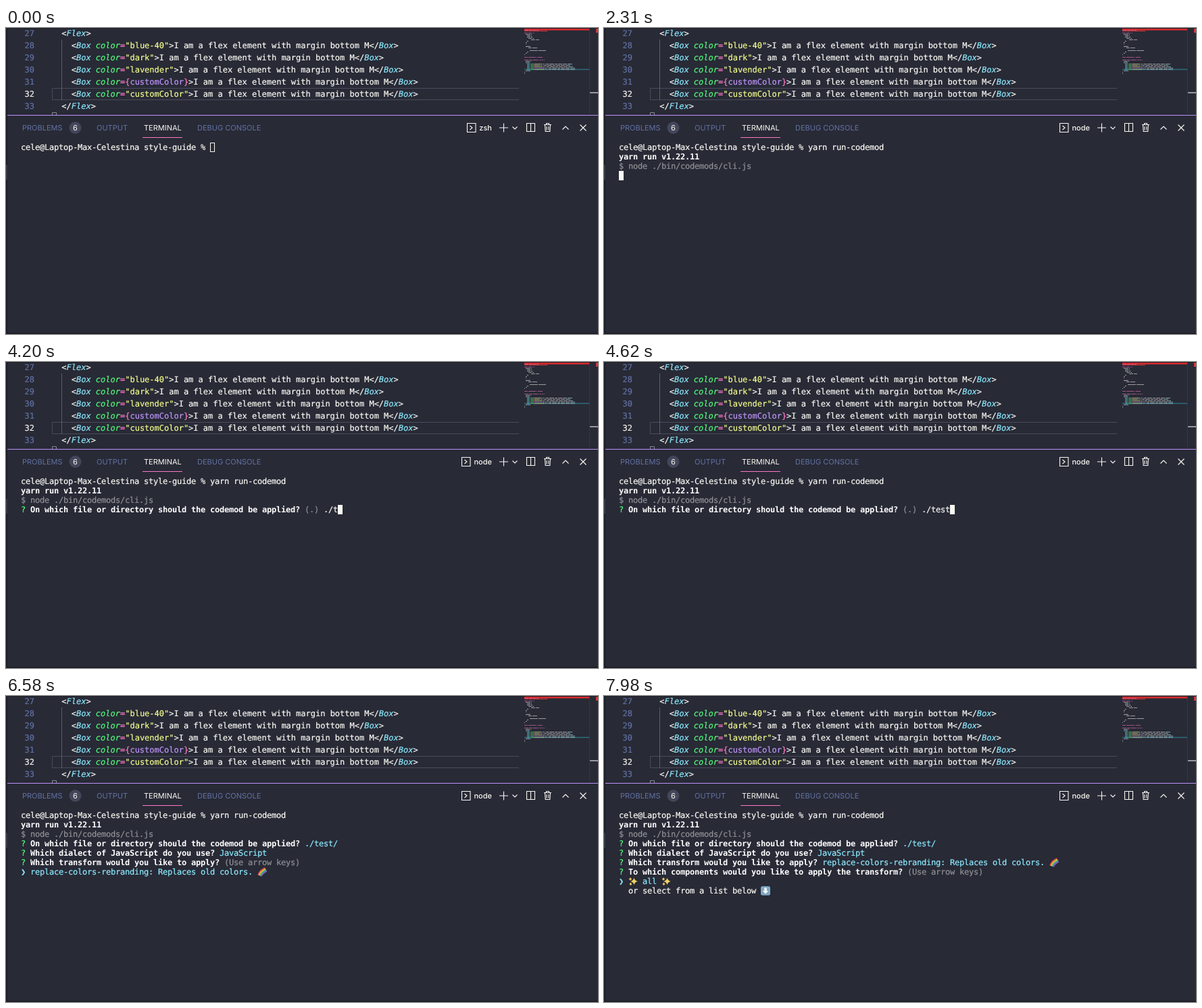
Recreate the animation shown at these times as an HTML page. Size 876x454 px, loop 8000 ms.

```html
<!DOCTYPE html>
<html lang="en">
<head>
<meta charset="utf-8">
<title>Codemod in a terminal</title>
<style>
html, body { margin: 0; height: 100%; overflow: hidden; background: #282a36; }
svg { display: block; width: 876px; height: 454px; }
text { white-space: pre; text-rendering: geometricPrecision; fill: currentColor; color: #f8f8f2; }
.mono text { font: 12px "DejaVu Sans Mono", Menlo, monospace; stroke: currentColor; stroke-width: .22px; }
.ui text { font: 11px Inter, "Open Sans", sans-serif; }
#term text { letter-spacing: -.224px; }
.mono .bold { font-weight: bold; color: #fff; stroke-width: 0; }
.mono .tag { color: #8be9fd; font-style: italic; }
.mono .attr { color: #50fa7b; font-style: italic; }
.mono .op { color: #ff79c6; }
.mono .str { color: #f1fa8c; }
.mono .var { color: #bd93f9; }
.mono .cyan { color: #8be9fd; }
.mono .green { color: #50fa7b; }
.mono .dim { color: #8f9095; }
.mono .num, .ui .off { color: #6272a4; }
.icon { fill: none; stroke: #f8f8f2; stroke-width: 1.1; }
</style>
</head>
<body>
<svg viewBox="0 0 876 454">
  <rect width="876" height="454" fill="#282a36"/>
  <g fill="none" stroke="#4a4c5c">
    <path d="M759 89.5H68.5V106.5H759"/>
    <path d="M82.5 17V107" stroke="#5a5c68"/>
    <path d="M68.5 129V125.5H74.5V129" stroke="#8a8b92"/>
    <path d="M863.5 0V128" stroke="#343644"/>
  </g>
  <g id="code" class="mono"></g>
  <g id="map"></g>
  <path d="M864 96H876" stroke="#b4b5ba" stroke-width="1.6"/>
  <path d="M873 1h3v6h-3z" fill="#d8393c"/>
  <path d="M0 129.5H876" stroke="#bd93f9" stroke-width="1.2"/>
  <g class="ui">
    <text x="24" y="152" class="off">PROBLEMS</text>
    <circle cx="102.5" cy="148" r="9" fill="#44475a"/>
    <text x="102.5" y="152" text-anchor="middle">6</text>
    <text x="134" y="152" class="off">OUTPUT</text>
    <text x="204" y="152">TERMINAL</text>
    <text x="283" y="152" class="off">DEBUG CONSOLE</text>
    <path d="M202 162.5H261" stroke="#ff79c6" stroke-width="1.2"/>
    <text id="shell" x="719" y="152" text-anchor="end" font-weight="500" style="font-weight:500"></text>
  </g>
  <g class="icon">
    <path id="shellIcon" d="M.5 141.5h12.5v13h-12.5zM4.5 145l3.5 3-3.5 3"/>
    <path d="M730 148H743M736.5 141.5V154.5M749.5 146.5l3.5 3.5 3.5-3.5"/>
    <path d="M770.5 141.5h12v12h-12zM776.5 141.5v12"/>
    <path d="M796 143.5h11M799.5 143v-1.500h4v1.500M797.500 144l.7 9.500h6.600l.7-9.500M800 146v5.500M803 146v5.500"/>
    <path d="M823.500 150.500l4.500-4.500 4.500 4.500M849.500 143.500l9 9M858.500 143.500l-9 9"/>
  </g>
  <g id="term" class="mono"></g>
  <path d="M0 0H876V1H2V454H0z" fill="#1c1d26"/>
  <path d="M0 203h2v22h-2z" fill="#343644"/>
  <path d="M0 452.500H876V454H0z" fill="#191a21"/>
</svg>
<script>
const $ = id => document.getElementById(id);
const escape = s => s.replace(/&/g, '&amp;').replace(/</g, '&lt;');

const star = (x, y, r) => `<path fill="#f5d060" d="M${x} ${y - r}` +
  [[r, r], [-r, r], [-r, -r], [r, -r]].map(([dx, dy], i) =>
    i % 2 ? `q${dx * .8} ${dy * .2} ${dx} ${dy}` : `q${dx * .2} ${dy * .8} ${dx} ${dy}`).join('') + 'z"/>';

const emoji = {
  rainbow: ['#f0454b', '#f89a3c', '#f8e05a', '#62c95c', '#4a9df0', '#a060c8'].map((c, i) =>
    `<path d="M${.8 + i} ${11.500 + i * .4}Q${3.500 + i} ${4 + i} ${11 + i * .6} ${.8 + i}" fill="none" stroke="${c}" stroke-width="1.2"/>`).join(''),
  sparkles: star(8.500, 7, 5.200) + star(3, 3.500, 2.600) + star(3.500, 11, 2.400),
  down: '<rect y=".3" width="14" height="13.400" rx="2.500" fill="#7ea9c4"/>' +
    '<path d="M7 11.500L2.800 7.300H5.300V2.500H8.700V7.300H11.200z" fill="#fff"/>'
};

// Lays [text, class] runs on a character grid
function runs(x, y, cell, list) {
  let col = 0;
  return list.map(([s, cls = '']) => {
    const left = x + col * cell;
    col += s.length;
    return emoji[cls]
      ? `<g transform="translate(${left} ${y - 11})">${emoji[cls]}</g>`
      : `<text x="${left}" y="${y}" class="${cls}">${escape(s)}</text>`;
  }).join('');
}

const box = value => [['    <'], ['Box', 'tag'], [' '], ['color', 'attr'], ['=', 'op'], ...value,
  ['>I am a flex element with margin bottom M</'], ['Box', 'tag'], ['>']];
const quoted = s => [[`"${s}"`, 'str']];
const code = [
  [['  <'], ['Flex', 'tag'], ['>']],
  box(quoted('blue-40')),
  box(quoted('dark')),
  box(quoted('lavender')),
  box([['{', 'op'], ['customColor', 'var'], ['}', 'op']]),
  box(quoted('customColor')),
  [['  </'], ['Flex', 'tag'], ['>']]
];

$('code').innerHTML = code.map((line, i) => {
  const y = 12 + i * 18;
  return runs(27.600, y, 7.224, [[String(27 + i), i == 5 ? '' : 'num']]) + runs(67.850, y, 7.224, line);
}).join('');

const head = `import React from 'r'

const theme = {
  colors: {
    blue: {
    dark: 1,
      name: 2,
          value: tone,
    },
  },
  }

  styles:
      main: 'dark',

        customColor: 'lavender',
    },
  },
}

const customColor = 'dark';

export const Example = () => {
  return (`.split('\n');
const mapLines = [...head.map(s => [[s, /^(im|co|ex)/.test(s) ? 'op' : '']]), ...code, [[')']], [['}']]];
const mapColor = { tag: '#8be9fd', attr: '#50fa7b', op: '#ff79c6', str: '#f1fa8c', var: '#bd93f9' };

function mapLine(line, y) {
  let col = 0;
  return line.map(([s, cls]) => {
    const d = [...s.matchAll(/\S+/g)].map(m => `M${767 + col + m.index} ${y}h${m[0].length}`).join('');
    col += s.length;
    return d && `<path d="${d}" stroke="${mapColor[cls] || '#f8f8f2'}" stroke-width="1.200" opacity=".55"/>`;
  }).join('');
}

$('map').innerHTML = '<path d="M767 0h96v3.500h-96z" fill="#d92b2f"/>' +
  '<path d="M767 4.500h34" stroke="#c9373c"/>' +
  '<path d="M767 61.500h96" stroke="#2c6c7c" stroke-width="1.500"/>' +
  mapLines.map((line, i) => mapLine(line, 51.500 + 2 * (i - head.length))).join('');

const keyTimes = [3640, 3780, 4200, 4340, 4480, 4620, 4900];
const transform = 'replace-colors-rebranding: Replaces old colors. ';
const hint = ['(Use arrow keys)', 'dim'];
const ask = (question, ...rest) => [['? ', 'green'], [question + ' ', 'bold'], ...rest];
const pick = (...rest) => [['❯ ', 'cyan'], ...rest];

function terminalRows(t) {
  const rows = [[['cele@Laptop-Max-Celestina style-guide % ' + (t < 1400 ? '' : 'yarn run-codemod')]]];
  if (t < 2030) return rows;
  if (t < 2240) return [...rows, []];
  rows.push([['yarn run v1.22.11', 'bold']], [['$ node ./bin/codemods/cli.js', 'dim']]);
  if (t < 3010) return [...rows, []];

  const target = 'On which file or directory should the codemod be applied?';
  if (t < 5390) {
    const typed = './test/'.slice(0, keyTimes.filter(k => k <= t).length);
    return [...rows, ask(target, ['(.) ', 'dim'], [typed])];
  }
  rows.push(ask(target, ['./test/', 'cyan']));

  const dialect = 'Which dialect of JavaScript do you use?';
  if (t < 6580) return [...rows, ask(dialect, hint), pick(['JavaScript', 'cyan']),
    [['  JavaScript with Flow']], [['  TypeScript']]];
  rows.push(ask(dialect, ['JavaScript', 'cyan']));

  const which = 'Which transform would you like to apply?';
  const choice = [[transform, 'cyan'], ['  ', 'rainbow']];
  if (t < 7490) return [...rows, ask(which, hint), pick(...choice)];
  return [...rows, ask(which, ...choice),
    ask('To which components would you like to apply the transform?', hint),
    pick(['  ', 'sparkles'], [' all ', 'cyan'], ['  ', 'sparkles']),
    [['  or select from a list below '], ['  ', 'down']]];
}

function cursor(rows, t) {
  if (t >= 5390) return '';
  const x = 22 + 7 * rows.at(-1).reduce((n, [s]) => n + s.length, 0);
  const y = 170 + 14 * (rows.length - 1);
  return t < 490
    ? `<rect x="${x + .5}" y="${y + .5}" width="6" height="13" fill="none" stroke="#f8f8f2"/>`
    : `<rect x="${x}" y="${y}" width="7" height="14" fill="#f8f8f2"/>`;
}

let shown;
function draw() {
  const t = performance.now() % 8000;
  const rows = terminalRows(t);
  const html = rows.map((row, i) => runs(22, 181 + 14 * i, 7, row)).join('') + cursor(rows, t);
  if (html != shown) $('term').innerHTML = shown = html;
  const node = t >= 2100;
  $('shell').textContent = node ? 'node' : 'zsh';
  $('shellIcon').setAttribute('transform', `translate(${node ? 674 : 682} 0)`);
  requestAnimationFrame(draw);
}
draw();
</script>
</body>
</html>
```
